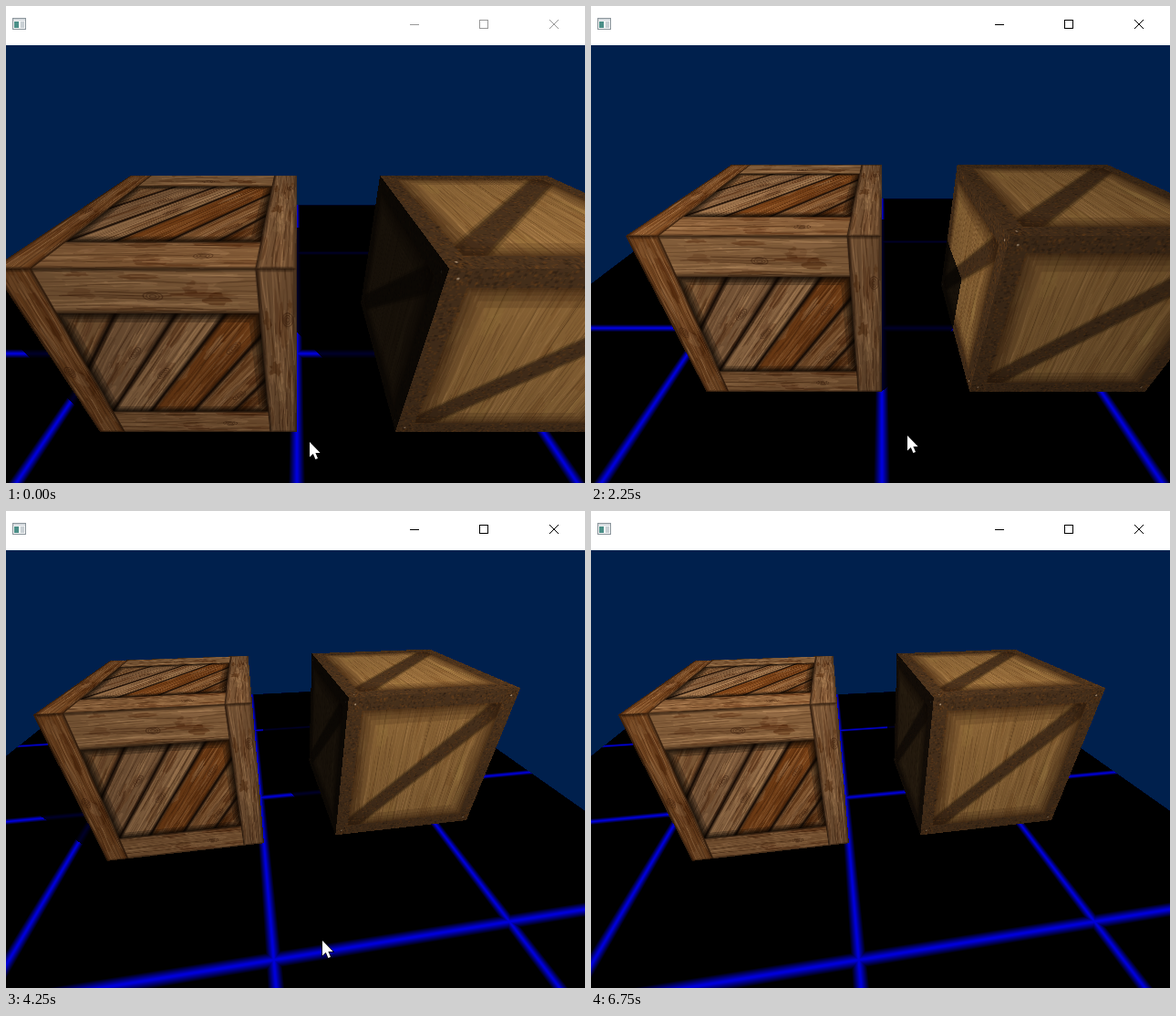
An HTML page with a canvas for the animation above (7 s loop, 635 px wide and 523 px high).

```html
<!DOCTYPE html>
<html lang="en">
<head>
<meta charset="utf-8">
<title>Crates</title>
<style>
  html, body { margin: 0; width: 100%; height: 100%; overflow: hidden; background: #fff; }
  canvas { display: block; }
</style>
</head>
<body>
<canvas id="stage" width="635" height="523"></canvas>
<script>
const W = 635, H = 523, BAR = 43, LOOP = 7000, STEP = 250;
const ctx = document.getElementById('stage').getContext('2d');

// ---- timing tracks: [time, values...] ----
const cameraZ = [[1900, 1.329], [2900, 1.978]];
const cameraYaw = [[3100, 0], [4100, 0.152]];
const lightPhase = [[0, 50], [1000, 287], [1750, 473], [3000, 771], [4250, 1114], [5750, 1550], [6750, 1806]];
const pointer = [[0, 333, 478], [1000, 345, 469], [1750, 347, 471], [5000, 347, 471], [5750, 321, 517], [6000, 313, 531]];

function track(keys, t) {
  if (t <= keys[0][0]) return keys[0].slice(1);
  for (let i = 1; i < keys.length; i++) {
    const a = keys[i - 1], b = keys[i];
    if (t <= b[0]) return a.slice(1).map((v, k) => v + (b[k + 1] - v) * (t - a[0]) / (b[0] - a[0]));
  }
  return keys[keys.length - 1].slice(1);
}

// ---- textures ----
const N = 320;
let seed = 7;
const rnd = (a = 0, b = 1) => {
  seed = (seed * 1664525 + 1013904223) >>> 0;
  return a + (b - a) * seed / 4294967296;
};
const rgba = (c, a = 1) => `rgba(${c[0]},${c[1]},${c[2]},${a})`;

function texture(paint) {
  const c = document.createElement('canvas');
  c.width = c.height = N;
  const g = c.getContext('2d', { willReadFrequently: true });
  paint(g);
  return g.getImageData(0, 0, N, N).data;
}

// Wavy fibres along the long side of a rectangle.
function grain(g, x, y, w, h, count, alpha) {
  const flat = w > h, len = flat ? w : h, wide = flat ? h : w;
  for (let i = 0; i < count; i++) {
    const off = rnd(0, wide), from = rnd(-0.3, 0.8) * len, to = from + rnd(0.2, 0.8) * len;
    const amp = rnd(0.3, 2), ph = rnd(0, 6);
    g.strokeStyle = rnd() < 0.55 ? rgba([45, 20, 5], rnd(0.3, 1) * alpha) : rgba([196, 152, 106], rnd(0.3, 1) * alpha * 0.9);
    g.lineWidth = rnd(0.5, 1.5);
    g.beginPath();
    for (let s = Math.max(0, from); s < Math.min(len, to); s += 5) {
      const d = off + amp * Math.sin(s / 22 + ph);
      flat ? g.lineTo(x + s, y + d) : g.lineTo(x + d, y + s);
    }
    g.stroke();
  }
}

// Ragged stain, stretched along the fibres.
function stain(g, x, y, rx, ry, style) {
  g.fillStyle = style;
  g.beginPath();
  for (let i = 0; i < 16; i++) {
    const a = i * Math.PI / 8, k = rnd(0.55, 1.25);
    g.lineTo(x + rx * k * Math.cos(a), y + ry * k * Math.sin(a));
  }
  g.fill();
}

function board(g, x, y, w, h, col) {
  g.save();
  g.beginPath();
  g.rect(x, y, w, h);
  g.clip();
  g.fillStyle = rgba(col);
  g.fillRect(x, y, w, h);
  const flat = w > h;
  for (let i = 0; i < 18; i++) {
    const long = rnd(10, 46), thin = rnd(2, 9);
    const tone = i % 2 ? rgba([66, 29, 6], rnd(0.15, 0.5)) : rgba([158, 120, 82], rnd(0.1, 0.36));
    stain(g, x + rnd(0, w), y + rnd(0, h), flat ? long : thin, flat ? thin : long, tone);
  }
  grain(g, x, y, w, h, 80, 0.42);
  const kx = x + rnd(0.2, 0.8) * w, ky = y + rnd(0.2, 0.8) * h;
  for (const r of [6, 4, 2]) {
    g.strokeStyle = rgba([38, 14, 3], 0.5);
    g.lineWidth = 1.1;
    g.beginPath();
    g.ellipse(kx, ky, flat ? r * 1.8 : r, flat ? r : r * 1.8, 0, 0, 7);
    g.stroke();
  }
  for (const lw of [2, 5, 9]) {
    g.strokeStyle = rgba([18, 9, 3], 0.3);
    g.lineWidth = lw;
    g.strokeRect(x, y, w, h);
  }
  g.restore();
}

const planked = texture(g => {
  const px = v => v * N;
  g.fillStyle = '#180d06';
  g.fillRect(0, 0, N, N);
  g.save();
  g.beginPath();
  g.rect(px(0.12), px(0.18), px(0.76), px(0.66));
  g.clip();
  const gaps = [0.25, 0.48, 0.7, 0.88, 1.08, 1.27, 1.5];
  const tones = [[116, 82, 50], [112, 80, 52], [134, 98, 64], [108, 58, 20], [112, 72, 38], [84, 46, 18]];
  tones.forEach((col, i) => {
    g.save();
    g.transform(1, 0, -0.7, 1, px(gaps[i]), 0);
    board(g, 1.5, px(0.1), px(gaps[i + 1] - gaps[i]) - 3, px(0.8), col);
    g.restore();
  });
  for (const lw of [4, 9, 16, 26]) {
    g.strokeStyle = 'rgba(10,5,2,.28)';
    g.lineWidth = lw;
    g.strokeRect(px(0.13), px(0.2), px(0.732), px(0.615));
  }
  g.restore();
  board(g, px(0.1), 0, px(0.8), px(0.198), [118, 84, 52]);
  board(g, px(0.1), px(0.817), px(0.8), px(0.183), [116, 80, 48]);
  board(g, 0, 0, px(0.13), N, [104, 62, 28]);
  board(g, px(0.862), 0, px(0.138), N, [104, 73, 46]);
});

const framed = texture(g => {
  const edge = 0.083 * N, inner = N - 2 * edge, rust = [62, 42, 24];
  g.fillStyle = rgba(rust);
  g.fillRect(0, 0, N, N);
  g.save();
  g.beginPath();
  g.rect(edge, edge, inner, inner);
  g.clip();
  g.fillStyle = rgba([122, 88, 47]);
  g.fillRect(0, 0, N, N);
  for (let i = 0; i < 40; i++)
    stain(g, rnd(0, N), rnd(0, N), rnd(3, 14), rnd(12, 50), i % 2 ? 'rgba(96,54,20,.16)' : 'rgba(150,118,66,.14)');
  grain(g, edge, edge, inner, inner + 1, 360, 0.22);
  for (let i = 1; i < 6; i++) {
    g.fillStyle = 'rgba(50,30,10,.35)';
    g.fillRect(edge + inner * i / 6, edge, 1.2, inner);
  }
  const strap = (lw, style) => {
    g.strokeStyle = style;
    g.lineWidth = lw;
    g.beginPath();
    g.moveTo(0, 1.01 * N);
    g.lineTo(1.01 * N, 0);
    g.stroke();
  };
  strap(0.13 * N, 'rgba(30,18,8,.22)');
  strap(0.108 * N, 'rgba(30,18,8,.4)');
  strap(0.088 * N, rgba(rust));
  for (const lw of [4, 10, 20, 36, 56]) {
    g.strokeStyle = 'rgba(40,22,8,.17)';
    g.lineWidth = lw;
    g.strokeRect(edge, edge, inner, inner);
  }
  g.restore();
  // rust speckles on the metal
  for (let i = 0; i < 2600; i++) {
    let u = rnd(0, N), v = rnd(0, edge);
    const side = i % 5;
    if (side === 4) { const d = rnd(-0.055, 0.055) * N; v = N - u + d; }
    else if (side > 1) [u, v] = [v, u];
    if (side === 1) v = N - v;
    if (side === 3) u = N - u;
    g.fillStyle = rnd() < 0.5 ? 'rgba(108,64,26,.3)' : 'rgba(28,20,14,.32)';
    g.fillRect(u, v, rnd(1, 4), rnd(1, 4));
  }
  g.fillStyle = '#8f7a62';
  for (const u of [0.042, 0.958]) for (const v of [0.042, 0.958]) {
    g.beginPath();
    g.arc(u * N, v * N, 1.6, 0, 7);
    g.fill();
  }
});

// ---- scene: unit crates standing on a square floor ----
const crates = [{ x: -1, tex: planked, gloss: 0.04 }, { x: 0.5, tex: framed, gloss: 0.16 }];
const FOCAL = 335, CX = 319, CY = 283 - BAR, EYE = 1.5625, PITCH = 0.581;
const SP = Math.sin(PITCH), CP = Math.cos(PITCH);
const FLOOR = 2.47, GRID = 1.25, HALF = 0.02, SOFT = 0.034, AMBIENT = 0.18, DIFFUSE = 1.5;
let axis = 0;

// Entry distance of a ray into a crate, or Infinity; sets the entered axis.
function enter(ox, oy, oz, dx, dy, dz, x0) {
  let a = (x0 - ox) / dx, b = (x0 + 1 - ox) / dx;
  let near = Math.min(a, b), far = Math.max(a, b), ax = 0;
  a = -oy / dy; b = (1 - oy) / dy;
  let lo = Math.min(a, b);
  if (lo > near) { near = lo; ax = 1; }
  far = Math.min(far, Math.max(a, b));
  a = (-0.5 - oz) / dz; b = (0.5 - oz) / dz;
  lo = Math.min(a, b);
  if (lo > near) { near = lo; ax = 2; }
  far = Math.min(far, Math.max(a, b));
  if (near > far || far < 1e-4 || near < -1e-3) return Infinity;
  axis = ax;
  return near;
}

const clamp = v => v < 0 ? 0 : v > 1 ? 1 : v;
const cover = (p, w) => clamp((HALF - Math.abs(p - Math.round(p / GRID) * GRID)) / w + 0.5) * Math.min(1, 2 * HALF / w);

function shadowed(x, y, z, lx, ly, lz, own) {
  for (const c of crates)
    if (c !== own && enter(x, y, z, lx, ly, lz, c.x) < 1) return true;
  return false;
}

function render(t) {
  const img = ctx.createImageData(W, H - BAR), out = img.data;
  const [oz] = track(cameraZ, t), [yaw] = track(cameraYaw, t);
  const LX = 2.5 * Math.sin(track(lightPhase, t)[0] * Math.PI / 180), LY = 3.25, LZ = 2.45;
  const sy = Math.sin(yaw), cy = Math.cos(yaw);
  let o = 0;
  for (let py = 0; py < H - BAR; py++) {
    const v = (py + 0.5 - CY) / FOCAL, ahead = CP - v * SP, dy = -(SP + v * CP);
    for (let px = 0; px < W; px++, o += 4) {
      const u = (px + 0.5 - CX) / FOCAL;
      const dx = sy * ahead + cy * u, dz = -cy * ahead + sy * u;
      let best = Infinity, crate = null, face = 0;
      for (const c of crates) {
        const d = enter(0, EYE, oz, dx, dy, dz, c.x);
        if (d < best) { best = d; crate = c; face = axis; }
      }
      let r = 0, g = 32, b = 77;
      if (crate) {
        const x = dx * best, y = EYE + dy * best, z = oz + dz * best;
        const lx = LX - x, ly = LY - y, lz = LZ - z, len = Math.hypot(lx, ly, lz);
        const dot = (face === 0 ? (dx > 0 ? -lx : lx) : face === 1 ? ly : lz) / len;
        let shade = AMBIENT;
        if (dot > 0 && !shadowed(x, y, z, lx, ly, lz, crate)) {
          const dl = Math.hypot(dx, dy, dz);
          const hx = lx / len - dx / dl, hy = ly / len - dy / dl, hz = lz / len - dz / dl;
          const n = face === 0 ? Math.abs(hx) : face === 1 ? hy : hz;
          shade += DIFFUSE * dot + crate.gloss * Math.pow(Math.max(0, n / Math.hypot(hx, hy, hz)), 16);
        }
        const tu = clamp(face === 0 ? z + 0.5 : x - crate.x) * (N - 1.01);
        const tv = clamp(face === 1 ? z + 0.5 : 1 - y) * (N - 1.01);
        const iu = tu | 0, iv = tv | 0, fu = tu - iu, fv = tv - iv;
        const i = (iv * N + iu) * 4, j = i + N * 4, T = crate.tex;
        const w0 = (1 - fu) * (1 - fv), w1 = fu * (1 - fv), w2 = (1 - fu) * fv, w3 = fu * fv;
        r = shade * (T[i] * w0 + T[i + 4] * w1 + T[j] * w2 + T[j + 4] * w3);
        g = shade * (T[i + 1] * w0 + T[i + 5] * w1 + T[j + 1] * w2 + T[j + 5] * w3);
        b = shade * (T[i + 2] * w0 + T[i + 6] * w1 + T[j + 2] * w2 + T[j + 6] * w3);
      } else if (dy < 0) {
        const d = -EYE / dy, x = dx * d, z = oz + dz * d;
        if (Math.abs(x) <= FLOOR && Math.abs(z) <= FLOOR) {
          r = g = b = 0;
          const wx = Math.max(SOFT, 1.5 * d / FOCAL), wz = Math.max(SOFT, 1.5 * d * d / EYE / FOCAL);
          const line = Math.max(cover(x, wx), cover(z, wz));
          if (line > 0) {
            const lx = LX - x, lz = LZ - z;
            let shade = AMBIENT;
            if (!shadowed(x, 0, z, lx, LY, lz, null)) shade += DIFFUSE * LY / Math.hypot(lx, LY, lz);
            b = 215 * line * Math.min(1, shade);
          }
        }
      }
      out[o] = r; out[o + 1] = g; out[o + 2] = b; out[o + 3] = 255;
    }
  }
  return img;
}

// ---- window bar and pointer ----
function box(x, y, w, h, col) {
  ctx.fillStyle = col;
  ctx.fillRect(x, y, w, h);
}

function titleBar(t) {
  box(0, 0, W, BAR, '#fff');
  box(7, 13, 15, 13, '#8b959b');
  box(8, 14, 13, 2, '#d5dade');
  box(8, 16, 13, 9, '#f2f4f5');
  box(9, 17, 5, 7, '#4b8f88');
  box(16, 17, 4, 7, '#c9d0d4');
  const ink = t < STEP ? '#999' : '#000';
  box(443, 20, 10, 1, ink);
  ctx.strokeStyle = ink;
  ctx.lineWidth = 1;
  ctx.strokeRect(519.5, 15.5, 9, 9);
  ctx.beginPath();
  ctx.moveTo(596, 15); ctx.lineTo(606, 25);
  ctx.moveTo(606, 15); ctx.lineTo(596, 25);
  ctx.stroke();
}

const arrow = new Path2D('M0 0V16.5L3.8 13L6.4 19L9 17.9L6.4 12H11.6Z');
function drawPointer(t) {
  const [x, y] = track(pointer, t);
  ctx.save();
  ctx.translate(Math.round(x), Math.round(y));
  ctx.lineWidth = 1.4;
  ctx.strokeStyle = '#000';
  ctx.stroke(arrow);
  ctx.fillStyle = '#fff';
  ctx.fill(arrow);
  ctx.restore();
}

const cache = new Map();
let shown = -1;
function tick(now) {
  const t = Math.floor(now % LOOP / STEP) * STEP;
  if (t !== shown) {
    shown = t;
    if (!cache.has(t)) cache.set(t, render(t));
    ctx.putImageData(cache.get(t), 0, BAR);
    titleBar(t);
    drawPointer(t);
  }
  requestAnimationFrame(() => tick(performance.now() - start));
}
const start = performance.now();
tick(0);
</script>
</body>
</html>
```
